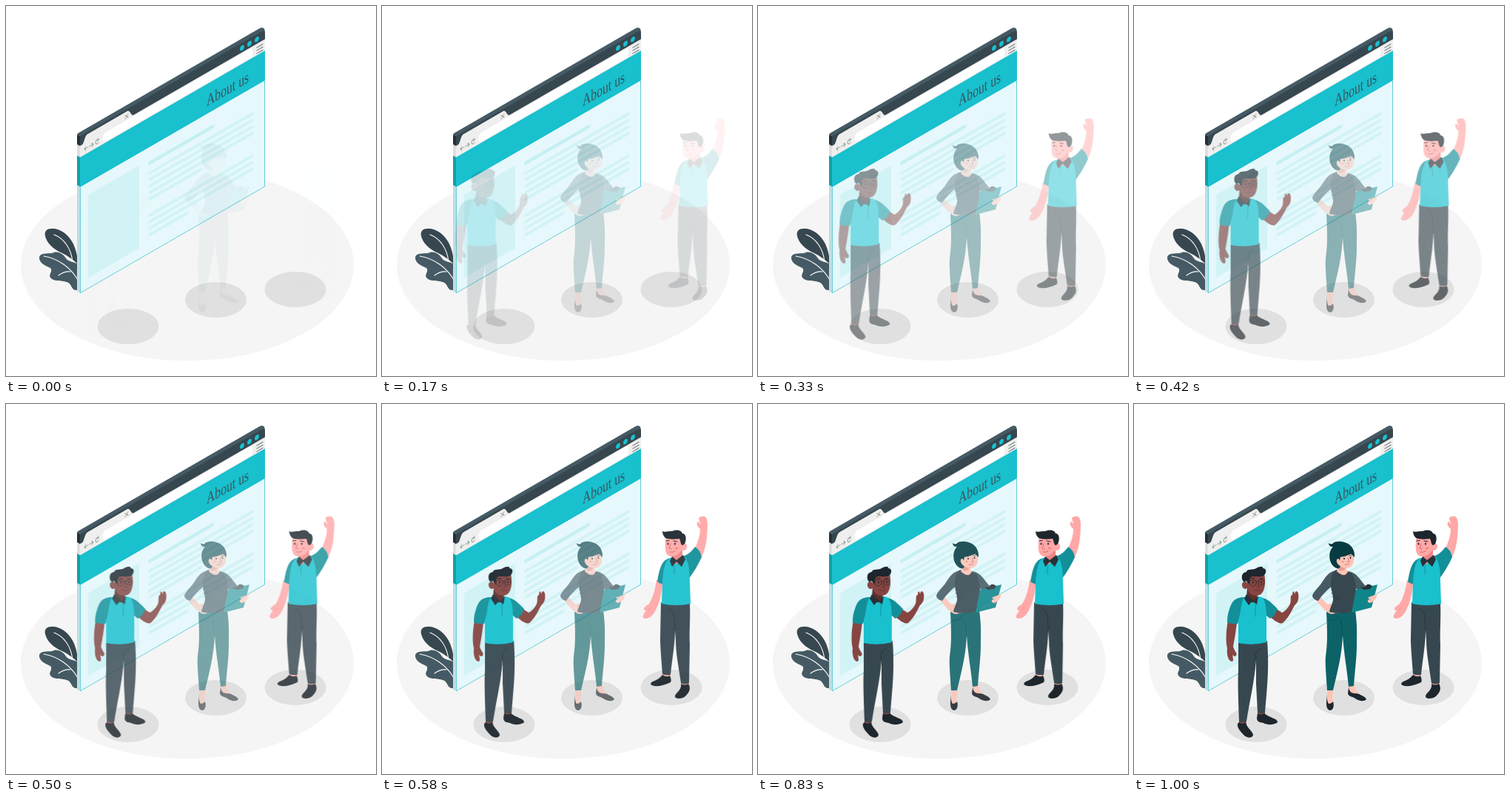
Recreate the animation shown at these times as an HTML page with a canvas. Size 500 by 500 pixels, loop 1040 ms.

```html
<!DOCTYPE html>
<html lang="en">
<head>
<meta charset="utf-8">
<title>About us</title>
<style>
html, body { margin: 0; width: 100%; height: 100%; overflow: hidden; background: #fff; }
canvas { display: block; width: 500px; height: 500px; }
</style>
</head>
<body>
<canvas id="stage" width="500" height="500"></canvas>
<script>
const LOOP = 1040, FPS = 24, SLIDE = 30, SLOPE = 0.577;
const TEAL = '#19c0ce', SHADE = '#128f99', DARK = '#37474f', INK = '#1c262c';
const stage = document.getElementById('stage').getContext('2d');

function layer(draw) {
  const c = document.createElement('canvas');
  c.width = c.height = 500;
  draw(c.getContext('2d'));
  return c;
}

// Helpers bound to one context
function pen(g) {
  g.lineCap = g.lineJoin = 'round';
  return {
    fill(color, d) { g.fillStyle = color; g.fill(new Path2D(d)); },
    line(color, width, d) {
      g.strokeStyle = color;
      g.lineWidth = width;
      g.stroke(new Path2D(d));
    },
    oval(color, x, y, rx, ry, turn = 0) {
      g.fillStyle = color;
      g.beginPath();
      g.ellipse(x, y, rx, ry, turn, 0, Math.PI * 2);
      g.fill();
    },
    box(color, x, y, w, h) { g.fillStyle = color; g.fillRect(x, y, w, h); }
  };
}

function drawPlant({ fill, line }) {
  fill(DARK, 'M97 349 C90 342 84 338 76 334 C64 329 55 320 53 311 C51 303 57 300 66 301 C84 304 97 324 97 349Z');
  line('#fff', 1.1, 'M65 309 C78 314 88 327 90 346');
  fill('#455a64', 'M97 384 C87 385 90 375 82 373 C75 370 64 373 60 367 C57 362 64 359 60 354 C53 351 44 347 45 339 C48 333 55 335 62 334 C69 330 77 334 81 341 C86 347 92 345 97 349Z');
  line('#fff', 1.1, 'M51 338 C70 341 87 353 97 370 M71 364 Q79 358 87 359');
}

function drawScreen(g, p) {
  const { fill, line, oval, box } = p;
  fill('#455a64', 'M96 174 Q96 172.500 98 171.500 L343 30 Q350 27 350 36 L350 46 L100 190Z');
  fill('#263238', 'M96 174 L101 177 L101 190 L96 187Z');
  fill('#dedede', 'M96 187 L101 190 L101 205 L96 202Z');
  fill('#139faa', 'M96 202 L101 205 L101 245 L96 242Z');
  fill('#bfdee3', 'M96 242 L101 245 L101 388 L96 386Z');

  // Front face: x from its left edge, y as on that edge
  g.save();
  g.transform(1, -SLOPE, 0, 1, 100, 0);
  fill(DARK, 'M0 176 L244 176 Q250 176.500 250 181 L250 191 L0 191Z');
  fill('#efefef', 'M0 189 H250 V205 H0Z M2 190 C6 189 6 179 10 179 H64 C68 179 69 190 74 190Z');
  fill('#fff', 'M33 190.500 H232 Q235 196 232 203 H33 Q27 197 33 190.500Z');
  box(TEAL, 0, 204.500, 250, 40.500);
  box('#e6f8fb', 0, 245, 250, 143);
  line('#66cdd7', 1, 'M0.500 245 V388 H249.500 V245');
  for (const x of [219, 229, 239]) oval(TEAL, x, 183, 3, 3.400);
  line('#7d8786', 1.300, 'M239 194 H247 M239 198 H247 M239 202 H247');
  line('#8b9783', 0.900, 'M61 183 L65 188 M65 183 L61 188');
  line('#7f8f89', 0.800, 'M11 197 H6 M8 194.500 L6 197 L8 199.500 M13 197 H18 M16 194.500 L18 197 L16 199.500 M25 195 Q21 192 21 197 Q22 201 25 199 M25 193 V195.500 H23');
  box('#d2f3f6', 11, 261.500, 69, 112);
  line('#c5f0f3', 5, 'M94.500 266.500 H179');
  const row = (y, end) => line('#d2f3f6', 4.600, `M94.500 ${y} H${end}`);
  for (let i = 0; i < 5; i++) row(280 + i * 8.800, i < 4 ? 232 : 163);
  for (let i = 0; i < 4; i++) row(337 + i * 8.800, i < 3 ? 232 : 144);
  g.restore();

  g.save();
  g.transform(0.713, -0.713 * SLOPE, 0, 1, 271, 135.500);
  g.fillStyle = '#3c535b';
  g.font = '22px "Liberation Serif", serif';
  g.fillText('About us', 0, 0);
  g.restore();
}

const scene = layer(g => {
  const p = pen(g);
  p.box('#fff', 0, 0, 500, 500);
  p.oval('#f5f5f5', 245, 350, 225, 129.500);
  drawPlant(p);
  drawScreen(g, p);
  p.oval('#e0e0e0', 165, 433, 41.500, 24);
  p.oval('#e0e0e0', 283.500, 397, 41.500, 24);
  p.oval('#e0e0e0', 391, 383, 41.500, 24);
});

const leftMan = layer(g => {
  const { fill, line, oval } = pen(g);
  const skin = '#874542', deep = '#5f2e2c';
  fill(skin, 'M142 426 L152 426 L151 434 L142 433Z M167 413 L177 413 L177 421 L167 421Z');
  fill(INK, 'M142 430 Q146 434 151 430 C152 437 160 442 161 447 C160 452 153 452 148 447 C144 442 139 438 140 432Z');
  fill(INK, 'M167 418 Q172 421 176 418 C183 424 194 425 194 430 C190 434 179 434 175 431 C170 430 166 430 166 424Z');
  fill(DARK, 'M141 322 Q160 326 180 320 C182 345 181 368 180 380 L177 417 Q172 419 167 417 L165 378 L165 346 C163 374 156 402 152 429 Q147 431 142 429 C141 400 140 375 141 360Z');
  line('#263238', 0.800, 'M165 346 Q163 337 167 333 L172 330');
  fill(skin, 'M127 292 C124 308 124 322 126 330 C125 338 127 347 132 348 C135 348 134 344 133 339 C136 343 140 340 138 336 C136 333 135 331 134 328 C136 317 138 305 139 295Z');
  fill(skin, 'M183 287 C190 293 197 298 201 296 C208 290 213 280 217 272 C222 268 223 263 222 256 C220 251 218 253 217 257 C216 251 214 253 214 258 C210 259 213 264 211 270 C208 276 204 280 200 282 L191 276Z');
  fill(SHADE, 'M169 261 C181 262 187 270 194 277 Q191 286 184 290 Q178 286 175 280Z');
  fill(SHADE, 'M150 261 C135 261 132 268 129 277 C126 286 126 291 126 295 Q133 298 140 297 L147 275Z');
  fill(TEAL, 'M149 261 C158 259 168 259 174 262 C180 271 179 284 179 322 Q160 327 141 323 L141 292 C145 281 144 268 149 261Z');
  line(SHADE, 0.900, 'M164 271 V287');
  fill(deep, 'M153 248 L152 262 Q159 272 166 266 L167 255Z');
  fill('#263238', 'M152 257 L149 263 L155 272 L160 266 L166 271 L168 260 L162 266Z');
  oval(skin, 150, 245, 4, 5, -0.3);
  fill(skin, 'M153 231 L176 229 C178 240 177 247 175 252 C173 257 169 259 165 259 C157 259 153 253 153 246Z');
  fill(INK, 'M147 239 C144 232 147 227 152 227 C152 222 162 225 165 222 C170 219 175 219 174 222 C180 222 179 229 175 232 C168 235 160 231 157 235 L155 244 C153 238 150 238 150 241Z');
  line(INK, 0.600, 'M156 240 Q160 236 165 239 Q166 246 160 246 Q156 245 156 240Z M168 239 Q172 236 176 239 Q176 245 171 245 Q168 244 168 239Z M165 240 H168 M156 241 L151 240');
  line(INK, 1, 'M158 236 L163 235.500 M170 236 L174 236');
  oval(INK, 161, 241, 1, 1.3);
  oval(INK, 172, 241, 1, 1.3);
  line(deep, 0.800, 'M167 242 L169 248 H166 M162 251 Q166 254 171 251');
});

const rightMan = layer(g => {
  const { fill, line, oval } = pen(g);
  const skin = '#ffa8a7', deep = '#ee8584';
  fill(skin, 'M377 362 H387 V370 H377Z M402 374 H413 V382 H402Z');
  fill(INK, 'M377 366 Q383 370 387 367 C389 372 390 376 386 377 C379 380 372 382 366 381 C360 380 360 377 364 375 C370 373 374 370 377 366Z');
  fill(INK, 'M402 378 Q407 381 412 378 C414 381 415 386 412 390 C409 395 405 398 399 398 C393 398 393 394 396 391 C400 387 403 383 402 378Z');
  fill(DARK, 'M375 268 Q396 273 414 268 C415 290 413 310 414 325 L413 377 Q407 380 402 377 C399 355 395 337 395 319 L394 306 C394 325 390 345 388 366 Q382 367 377 365 C375 340 374 325 374 318Z');
  line('#263238', 0.800, 'M394 306 Q394 288 391 281 L385 276');
  fill(skin, 'M420 199 C424 187 428 179 428 169 C424 166 423 162 424 159 C426 159 427 161 429 162 C425 156 425 152 430 152 C435 151 437 153 438 161 C438 170 437 182 436 188 C434 197 432 203 429 209Z');
  fill(skin, 'M369 238 L378 241 C376 255 373 268 369 276 C366 284 360 290 354 290 C348 289 351 285 355 279 C349 279 353 273 358 271 C363 265 367 252 369 238Z');
  line(deep, 0.700, 'M357 279 L361 275');
  fill(SHADE, 'M403 206 C410 205 416 200 421 193 Q428 197 430 207 C425 218 419 228 412 237Z');
  fill(SHADE, 'M388 208 C376 210 373 222 370 240 Q374 244 379 243 L386 225Z');
  fill(TEAL, 'M387 208 C397 206 404 205 408 207 C413 216 414 226 414 240 L415 270 Q396 274 376 270 L377 240 C378 225 380 212 387 208Z');
  line(SHADE, 0.900, 'M393 219 V230');
  fill(deep, 'M390 201 L390 209 L395 217 L404 208 L404 195Z');
  fill('#263238', 'M390 206 L387 212 L390 220 L396 213 L403 220 L408 210 L405 204 L396 211Z');
  oval(skin, 406, 193, 4, 5, 0.3);
  fill(skin, 'M382 178 C380 190 380 199 383 203 C387 208 394 206 398 203 L404 197 L406 183 L398 176Z');
  fill(INK, 'M381 181 Q377 177 377 172 C381 174 386 171 390 172 C397 169 403 171 404 175 C409 175 410 183 407 189 L404 191 C401 189 402 186 400 182 C394 183 385 183 381 181Z');
  oval(INK, 384.5, 189, 1, 1.4);
  oval(INK, 394, 189, 1, 1.4);
  line(INK, 1, 'M382 185 L386 184.500 M392 185 L397 186');
  line('#c95f62', 0.800, 'M388 189 L386 195 L389 196 M387 200 Q391 201 394 199');
  oval(deep, 396, 195, 2, 1.4);
});

const woman = layer(g => {
  const { fill, line, oval } = pen(g);
  const skin = '#ffc3b6', deep = '#eb9c8c', hair = '#073b42', cloth = '#0c6267';
  fill(skin, 'M261 384 H269 L268 407 L262 408Z M290 379 L298 379 L299 386 L308 396 L290 389Z');
  fill(INK, 'M261 390 Q260 401 263 405 Q267 405 269 402 C271 408 269 414 265 414 C260 413 260 407 260 403Z');
  fill(INK, 'M290 383 Q291 390 297 391 Q304 391 306 393 Q313 396 314 399 C311 403 303 401 299 398 C295 395 290 396 289 391Z');
  fill(cloth, 'M260 281 Q280 284 299 279 C302 300 301 311 301 326 C301 344 298 365 297 381 L290 382 C288 360 284 340 282 313 C281 340 274 365 269 387 L261 387 C260 370 258 350 259 341 C262 322 261 303 260 281Z');
  line('#084d52', 0.800, 'M282 313 Q281 299 279 292 M263 292 Q272 295 276 288');
  fill(skin, 'M244 262 L249 258 L262 271 C267 268 272 271 272 275 L274 281 C270 285 264 284 261 281 C255 277 250 270 244 262Z');
  line(deep, 0.700, 'M264 273 Q268 277 272 278');
  fill('#455a64', 'M273 225 C263 226 258 235 252 244 C246 251 241 256 241 260 Q243 265 249 266 C254 258 261 251 268 246Z');
  fill('#455a64', 'M288 226 C301 227 304 236 313 246 L305 253 L295 246Z');
  fill(DARK, 'M273 224 C282 225 290 226 295 230 C300 239 301 252 299 263 L299 280 Q280 285 264 281 C265 273 272 266 268 256 C264 243 266 229 273 224Z');
  line('#263238', 0.700, 'M267 255 Q270 261 276 264 M268 260 Q270 265 274 267');
  fill('#0f858b', 'M300 251 L329 244 L321 275 L294 282Z');
  fill('#263238', 'M306 248 L312 247 Q315 242 319 244 L322 246 L319 250 L311 251Z');
  fill(skin, 'M328 256 C329 262 325 267 319 269 Q315 268 316 265 L320 263 Q315 264 317 261 L323 259Z');
  fill(deep, 'M277 214 L276 226 Q282 234 287 230 L287 217Z');
  fill(skin, 'M275 223 Q281 229 286 221 L289 227 Q283 235 274 226Z');
  fill(hair, 'M269 193 Q263 193 263 188 Q268 191 270 187 C282 183 297 189 298 204 L296 211 C291 205 285 207 280 208 C280 218 279 224 274 222 C262 217 262 199 269 193Z');
  fill(skin, 'M279 206 C286 207 293 202 296 202 C299 212 296 219 291 221 C285 223 279 220 276 217 C273 214 273 209 276 209 Q278 210 278 212Z');
  fill(hair, 'M274 208 C282 207 287 203 290 198 Q294 204 298 207 C298 194 292 187 279 188 C270 190 268 200 274 208Z');
  oval(INK, 284, 209, 0.9, 1.3);
  oval(INK, 292.5, 208, 0.9, 1.3);
  line(hair, 0.800, 'M281 206 L285 205.500 M291 205 L294 205');
  line('#c7685f', 0.800, 'M289 208 L291 213 L288 213.500 M285 217 Q289 218 291 216');
  oval(deep, 282, 213, 1.8, 1.3);
});

// Cubic timing curve with a soft overshoot
function ease(t) {
  const curve = (s, a, b) => 3 * (1 - s) * s * ((1 - s) * a + s * b) + s * s * s;
  let lo = 0, hi = 1;
  for (let i = 0; i < 24; i++) {
    const mid = (lo + hi) / 2;
    if (curve(mid, 0.36, 0.5) < t) lo = mid; else hi = mid;
  }
  return curve(lo, -0.01, 1.38);
}

function put(img, x, alpha) {
  stage.globalAlpha = Math.max(0, Math.min(1, alpha));
  stage.drawImage(img, x, 0);
}

function render(ms) {
  const step = Math.floor((ms + 5) * FPS / 1000);
  const t = Math.min(1, (step + 0.9) / FPS);
  const e = t < 1 ? ease(t) : 1;
  put(scene, 0, 1);
  put(woman, 0, t);
  put(leftMan, SLIDE * (e - 1), e);
  put(rightMan, SLIDE * (1 - e), e);
}

const start = performance.now();
function tick() {
  render((performance.now() - start) % LOOP);
  requestAnimationFrame(tick);
}
tick();
</script>
</body>
</html>
```
